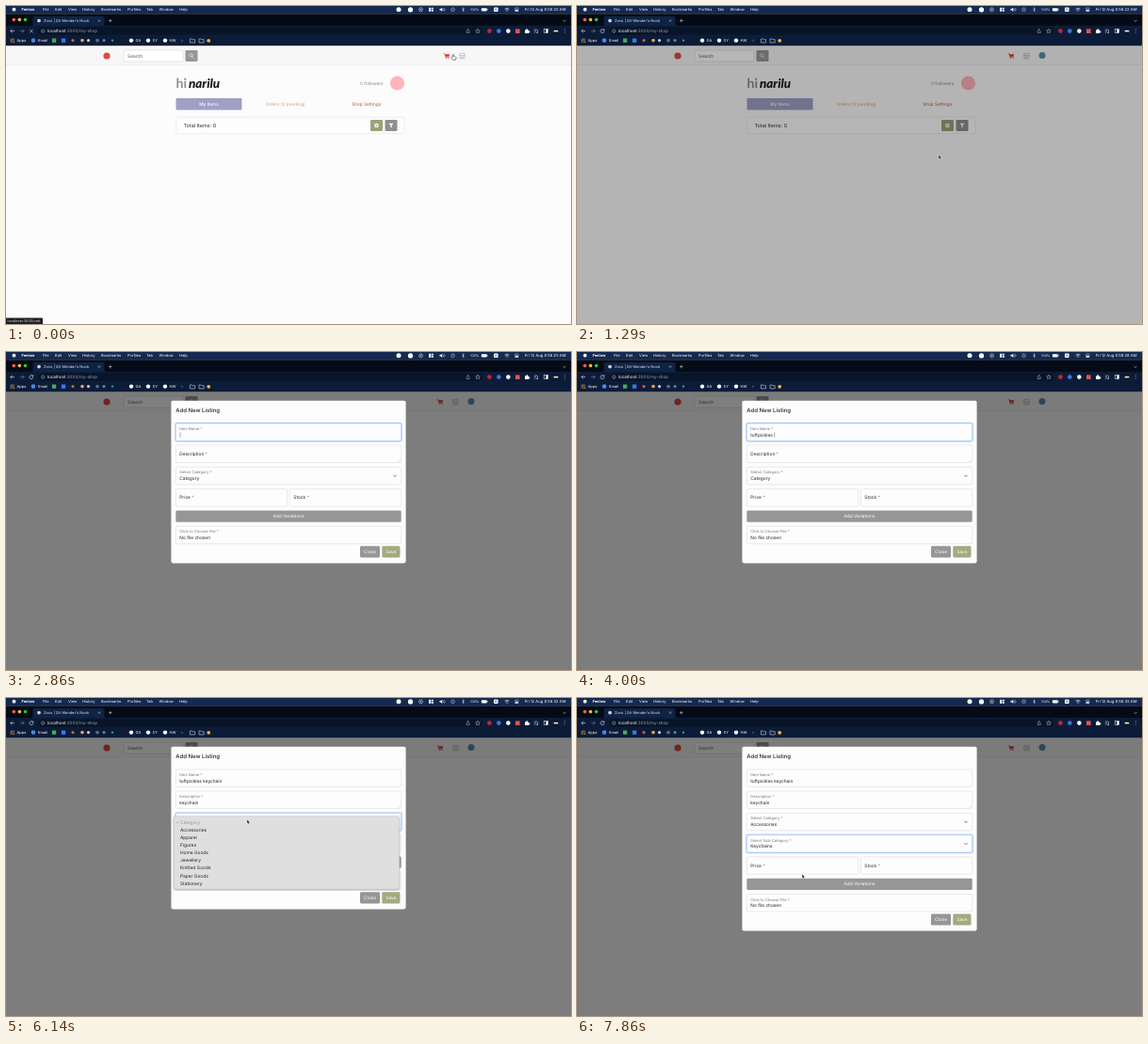
Write an HTML page that moves like this. It is 600 by 338 pixels and loops after 8000 ms.

```html
<!DOCTYPE html>
<html lang="en">
<head>
<meta charset="utf-8">
<title>Add New Listing</title>
<style>
  html, body { margin: 0; width: 100%; height: 100%; overflow: hidden; background: #fcfcfc; }
  svg { display: block; width: 100vw; height: 100vh; }
  text { font-family: Inter, "Liberation Sans", sans-serif; text-rendering: geometricPrecision; white-space: pre; }
</style>
</head>
<body>
<svg id="stage" viewBox="0 0 600 338"></svg>
<script>
const LOOP = 8000;
const stage = document.getElementById('stage');

function el(tag, attrs, parent, content) {
  const e = document.createElementNS('http://www.w3.org/2000/svg', tag);
  for (const k in attrs) e.setAttribute(k, attrs[k]);
  if (content !== undefined) e.textContent = content;
  parent.appendChild(e);
  return e;
}
const group = (p, attrs = {}) => el('g', attrs, p);
const box = (p, x, y, width, height, fill, more = {}) => el('rect', { x, y, width, height, fill, ...more }, p);
const dot = (p, cx, cy, r, fill, more = {}) => el('circle', { cx, cy, r, fill, ...more }, p);
const line = (p, d, stroke, w = 0.6, more = {}) => el('path', { d, stroke, 'stroke-width': w, fill: 'none', ...more }, p);
const shape = (p, d, fill, more = {}) => el('path', { d, fill, ...more }, p);
const label = (p, x, y, size, fill, str, more = {}) => el('text', { x, y, 'font-size': size, fill, ...more }, p, str);
const show = (e, on) => e.setAttribute('visibility', on ? 'inherit' : 'hidden');
const clamp = v => Math.max(0, Math.min(1, v));
const ramp = (t, a, b) => clamp((t - a) / (b - a));
const mid = { 'text-anchor': 'middle' };

// ---- page
const page = group(stage);
box(page, 0, 42, 600, 296, '#fcfcfc');
box(page, 0, 42, 600, 21, '#f7f7f7');
box(page, 0, 62.6, 600, 0.5, '#e2e2e2');
dot(page, 107, 53, 3.6, '#dd4b42');
box(page, 125, 47, 63, 12, '#fff', { rx: 1.2, stroke: '#cfcfcf', 'stroke-width': 0.5 });
label(page, 129, 54.8, 4.9, '#555', 'Search');
box(page, 190.5, 47, 13, 12, '#979797', { rx: 1.3 });
dot(page, 196.4, 52.4, 1.7, 'none', { stroke: '#fff', 'stroke-width': 0.6 });
line(page, 'M197.7 53.7l1.7 1.7', '#fff');

const nav = group(page);
line(nav, 'M464.6 50.6h1.2l1 3.6h4', '#d63a35', 0.6);
shape(nav, 'M466 51.2h5.2l-.8 2.6h-3.8z', '#d63a35');
dot(nav, 467.4, 55.2, 0.6, '#d63a35');
dot(nav, 470, 55.2, 0.6, '#d63a35');
line(nav, 'M481.8 52.6v3.2h5.2v-3.2M481.4 52.4l.6-2h4.8l.6 2zM483.4 55.6v-1.8h2v1.8', '#aaa', 0.6);
const userIcon = group(page);
dot(userIcon, 494, 52.4, 3.5, '#5a8fae');

label(page, 180.5, 87.4, 14, '#8d8d8d', 'hi', { 'font-family': 'Lato, sans-serif', style: 'font-family:Lato,sans-serif', 'font-weight': 700 });
label(page, 194, 87.4, 13.4, '#161616', 'narilu', { style: 'font-family:Lato,sans-serif', 'font-weight': 800, 'font-style': 'italic' });
label(page, 400.5, 83.6, 4.7, '#858585', '0 followers', { 'text-anchor': 'end' });
dot(page, 415.5, 82, 7.6, '#ffb3bb');

box(page, 180.5, 98, 70, 12.6, '#a09fc5', { rx: 1.3 });
label(page, 215.5, 106, 4.7, '#fff', 'My Items', { ...mid, 'font-weight': 500 });
label(page, 296.5, 106, 4.7, '#dda05a', 'Orders (0 pending)', mid);
label(page, 382.7, 106, 4.7, '#bd5538', 'Shop Settings', mid);

box(page, 180.7, 118.2, 242.3, 17.4, '#fdfdfd', { rx: 1.2, stroke: '#dfdfdf', 'stroke-width': 0.5 });
label(page, 188.5, 128.8, 5.45, '#2b2b2b', 'Total Items: 0');
box(page, 387, 121, 13, 12, '#99a377', { rx: 1.3 });
dot(page, 393.4, 127, 2.3, '#fff');
line(page, 'M392.1 127h2.6M393.4 125.7v2.6', '#99a377', 0.6);
box(page, 402.5, 121, 13, 12, '#8f8f8f', { rx: 1.3 });
shape(page, 'M406.5 124.8h5l-1.9 2.3v2.4l-1.2-.6v-1.8z', '#fff');

const shade = box(stage, 0, 42, 600, 296, '#000', { opacity: 0 });

// ---- modal
const modal = group(stage);
const sheet = box(modal, 175.4, 51.8, 249.2, 172.6, '#fdfdfd', { rx: 1.8 });
label(modal, 180.3, 63.8, 6, '#222', 'Add New Listing', { 'font-weight': 500 });

function field(p, x, y, w, name, value = '', select = false) {
  const ring = box(p, x - 0.4, y - 0.4, w + 0.8, 19.3, 'none', { rx: 1.6, stroke: '#b9d4fd', 'stroke-width': 1.5 });
  const edge = box(p, x, y, w, 18.5, '#fdfdfd', { rx: 1.2, 'stroke-width': 0.5 });
  const tag = el('text', { 'font-size': 4.8 }, p, name);
  el('tspan', { fill: '#b87070' }, tag, ' *');
  const text = label(p, x + 4, y + 13.5, 4.8, '#222', value);
  const caret = box(p, 0, y + 9.4, 0.4, 5.2, '#222');
  if (select) line(p, `M${x + w - 8.4} ${y + 8.5}l1.7 1.7l1.7-1.7`, '#444', 0.7);
  return (focus, float, str, typing) => {
    show(ring, focus);
    edge.setAttribute('stroke', focus ? '#86b7fe' : '#d4d4d4');
    tag.setAttribute('transform', `translate(${x + 4} ${y + 10.8 - 3.7 * float}) scale(${1 - 0.15 * float})`);
    tag.setAttribute('fill', float > 0.5 ? '#777' : '#222');
    if (text.textContent !== str) text.textContent = str;
    show(caret, focus && typing);
    if (focus && typing) caret.setAttribute('x', x + 4.5 + (str ? text.getComputedTextLength() : 0));
  };
}
const setName = field(modal, 180.3, 76, 239.4, 'Item Name');
const setDesc = field(modal, 180.3, 99, 239.4, 'Description');
line(modal, 'M416.9 116.6l1.8-1.8M418 116.6l.7-.7', '#999', 0.3);
const setCat = field(modal, 180.3, 122.3, 239.4, 'Select Category', 'Category', true);
const subRow = group(modal);
const setSub = field(subRow, 180.3, 145.6, 239.4, 'Select Sub-Category', 'Sub-Category', true);

const lower = group(modal);
field(lower, 180.3, 145.6, 118.4, 'Price')(false, 0, '');
field(lower, 301.3, 145.6, 118.4, 'Stock')(false, 0, '');
field(lower, 180.3, 185.3, 239.4, 'Click to Choose File')(false, 1, 'No file chosen');
function button(x, y, w, fill, str) {
  box(lower, x, y, w, 12.2, fill, { rx: 1.3 });
  label(lower, x + w / 2, y + 7.8, 4.8, '#fff', str, mid);
}
button(180.3, 168.5, 239.4, '#969696', 'Add Variations');
button(376, 206.2, 21, '#969696', 'Close');
button(399.3, 206.2, 19.2, '#a2ab80', 'Save');

// ---- native popup lists
function popup(y, items) {
  const g = group(stage);
  const h = items.length * 8.12 + 4.6;
  const frame = { rx: 2 };
  box(g, 177.4, y + 0.6, 241, h + 0.8, '#000', { rx: 2.4, opacity: 0.18 });
  box(g, 178, y, 239.8, h, '#dfdfe0', { ...frame, stroke: '#b8b8b8', 'stroke-width': 0.4 });
  const bar = box(g, 179.5, 0, 236.8, 8.1, '#3f82f5', { rx: 1.2 });
  const rows = items.map((s, i) => label(g, 185, y + 8.1 + i * 8.12, 4.85, i ? '#222' : '#999', s));
  line(g, `M181 ${y + 6.5}l.9 1.2l1.6-2.5`, '#999', 0.5);
  return (open, pos) => {
    show(g, open);
    const i = Math.floor((pos - y - 2.3) / 8.12);
    const hot = open && i > 0 && i < items.length;
    show(bar, hot);
    if (hot) bar.setAttribute('y', y + 2.3 + i * 8.12);
    rows.forEach((r, k) => k && r.setAttribute('fill', hot && k === i ? '#fff' : '#222'));
  };
}
const catList = popup(125.6, ['Category', 'Accessories', 'Apparel', 'Figures', 'Home Goods',
  'Jewellery', 'Knitted Goods', 'Paper Goods', 'Stationery']);
const subList = popup(148.9, ['Sub-Category', 'Bags', 'Earrings', 'Keychains', 'Necklaces',
  'Pins', 'Rings', 'Scarves', 'Straps', 'Others']);

// ---- browser and menu bar
const ui = group(stage);
const pale = '#e6eaf2';
box(ui, 0, 0, 600, 8.2, '#152a50');
box(ui, 0, 8.2, 600, 13, '#050b16');
box(ui, 0, 21, 600, 21.2, '#0c1c38');
shape(ui, 'M27 21.2q1.5 0 1.5-1.5v-7q0-1.7 1.7-1.7h72.6q1.7 0 1.7 1.7v7q0 1.5 1.5 1.5z', '#0f2345');
box(ui, 34, 22.4, 472, 8.4, '#081427', { rx: 4.2 });

dot(ui, 8.5, 3.7, 1.9, '#fff');
[[39, 'File'], [52, 'Edit'], [66, 'View'], [81, 'History'], [101, 'Bookmarks'], [129, 'Profiles'],
 [149, 'Tab'], [162.5, 'Window'], [184, 'Help']].forEach(([x, s]) => label(ui, x, 5.2, 4, '#fff', s));
label(ui, 16.5, 5.2, 4, '#fff', 'Fenlow', { 'font-weight': 700 });

dot(ui, 417, 3.7, 2.5, '#fff');
dot(ui, 429.5, 3.9, 2.6, '#fff');
dot(ui, 440.5, 3.8, 2, 'none', { stroke: '#cfd6e4', 'stroke-width': 0.6 });
dot(ui, 440.5, 3.8, 0.8, '#cfd6e4');
box(ui, 449, 1.8, 2, 4, '#fff');
box(ui, 451.6, 1.8, 2.2, 1.7, '#fff');
box(ui, 451.6, 4.1, 2.2, 1.7, '#fff');
shape(ui, 'M460.5 3h1.2l1.6-1.3v4.2l-1.6-1.3h-1.2z', '#fff');
line(ui, 'M464.3 2.6q1 1.2 0 2.4M465.4 2q1.6 1.8 0 3.6', '#fff', 0.4);
dot(ui, 474.5, 3.8, 1.9, 'none', { stroke: '#cfd6e4', 'stroke-width': 0.5 });
line(ui, 'M474.5 2.7v1.3h.9', '#cfd6e4', 0.4);
line(ui, 'M484.5 2.7l2 2.1l-1 1.1v-4.2l1 1.1l-2 2.1', '#fff', 0.4);
label(ui, 493, 5.1, 3.5, '#fff', '100%');
box(ui, 504.8, 2.2, 6, 3.2, '#fff', { rx: 0.8 });
box(ui, 511.2, 3.2, 0.5, 1.2, '#fff');
box(ui, 518, 1.6, 4.6, 4.4, '#fff', { rx: 0.8 });
label(ui, 520.3, 5.2, 3.8, '#152a50', 'A', mid);
line(ui, 'M529.6 3.2q2.4-2 4.8 0M530.5 4.2q1.5-1.2 3 0', '#fff', 0.6);
dot(ui, 532, 5.3, 0.5, '#fff');
box(ui, 540.3, 2, 4, 1.6, 'none', { rx: 0.8, stroke: '#fff', 'stroke-width': 0.4 });
box(ui, 540.3, 4.2, 4, 1.6, '#fff', { rx: 0.8 });
const clock = label(ui, 594.5, 5.2, 4.2, '#fff', '', { 'text-anchor': 'end' });

['#fe5f57', '#febc2e', '#28c840'].forEach((c, i) => dot(ui, 8.3 + i * 6.1, 14.6, 1.8, c));
dot(ui, 35, 15.6, 1.9, '#cfd3cb');
label(ui, 40, 17.1, 3.95, '#e4eaf4', "Zovu | QV Mender's Nook");
line(ui, 'M98 14.6l2 2m0-2l-2 2', pale, 0.5);
line(ui, 'M109 15.6h3.6M110.8 13.8v3.6', pale, 0.5);
line(ui, 'M591.4 15l1.6 1.6l1.6-1.6', pale, 0.5);

line(ui, 'M9 26.6h-4.2m1.9-1.9l-1.9 1.9l1.9 1.9', pale);
line(ui, 'M15 26.6h4.2m-1.9-1.9l1.9 1.9l-1.9 1.9', '#78849a');
const stop = line(ui, 'M25.3 25l3.2 3.2m0-3.2l-3.2 3.2', pale);
const reload = line(ui, 'M28.6 25.6a2 2 0 1 0 .3 1.5M28.9 24.4v1.6h-1.6', pale);
dot(ui, 39.2, 26.6, 1.7, 'none', { stroke: pale, 'stroke-width': 0.4 });
line(ui, 'M39.2 26.3v1.2', pale, 0.4);
const url = label(ui, 43.8, 28.2, 4.6, '#fff', 'localhost');
el('tspan', { fill: '#93a0b5' }, url, ':3000/my-shop');

line(ui, 'M489.2 26.2v2.4h3v-2.4M490.7 27.2v-2.8m-1 1l1-1l1 1', pale, 0.4);
shape(ui, 'M501 24.2l.7 1.6l1.7.1l-1.3 1.1l.4 1.7l-1.5-.9l-1.5.9l.4-1.7l-1.3-1.1l1.7-.1z', 'none', { stroke: pale, 'stroke-width': 0.4 });
dot(ui, 513.4, 26.6, 2.3, '#c4262c');
dot(ui, 523.3, 26.6, 2.3, '#3c78d8');
dot(ui, 533.3, 26.6, 2.3, '#f2f2f2');
box(ui, 541, 24.4, 4.6, 4.6, '#e2534d');
shape(ui, 'M551 25.4h1.4a.8.8 0 1 1 1.5 0h1.3v1.3a.8.8 0 1 1 0 1.4v1h-4.2z', '#fff');
line(ui, 'M560.8 25h3.2M560.8 26.6h2.2M560.8 28.2h1.6M564.6 25v3.2', pale, 0.5);
dot(ui, 564, 28.2, 0.7, pale);
box(ui, 571.2, 24.6, 4.2, 4, 'none', { stroke: '#fff', 'stroke-width': 0.5 });
box(ui, 573.4, 24.6, 2, 4, '#fff');
dot(ui, 584, 26.6, 2.8, '#111');
box(ui, 581.6, 25.8, 4.8, 1.8, '#dfe3e8', { rx: 0.6 });
[24.8, 26.6, 28.4].forEach(y => dot(ui, 593.2, y, 0.45, pale));

for (let i = 0; i < 9; i++)
  box(ui, 4.6 + i % 3 * 1.6, 34.6 + Math.floor(i / 3) * 1.6, 1.1, 1.1, ['#e8584b', '#f0b43c', '#58a55c'][(i + Math.floor(i / 3)) % 3]);
[[11.5, 'Apps'], [34, 'Email'], [137.5, 'GA'], [155.6, 'SY'], [173.5, 'HW']]
  .forEach(([x, s]) => label(ui, x, 38.2, 4, '#fff', s));
[[29, '#4a86e8', 2.3], [81, '#f0a050', 1.8], [87.5, '#c9ccd2', 1.6], [97, '#5d6b82', 1.9], [104, '#5f7fa8', 1.6],
 [133, '#fff', 2.2], [151, '#fff', 2.2], [169, '#fff', 2.2]].forEach(([x, c, r]) => dot(ui, x, 36.6, r, c));
box(ui, 48.9, 34.5, 4.3, 4.3, '#4da567');
box(ui, 58.9, 34.5, 4.3, 4.3, '#3b78e7');
dot(ui, 71, 36.6, 1.6, '#c8643c');
dot(ui, 113, 36.6, 1.2, '#38a868');
dot(ui, 187, 36.8, 1.4, '#25406c');
for (const x of [195.4, 205])
  shape(ui, `M${x} 35h2l.7.7h2.5v3.2h-5.2z`, 'none', { stroke: '#cdd4df', 'stroke-width': 0.6 });
dot(ui, 215.2, 36.8, 1.9, '#f0b840');

// ---- status bubble
const status = group(stage);
box(status, -1, 331.6, 40, 7.4, '#1c1f24', { rx: 1 });
label(status, 1.6, 336.2, 3.75, '#d5d8dc', 'localhost:3000/cart');

// ---- pointers
const outline = { stroke: '#fff', 'stroke-width': 0.4, 'stroke-linejoin': 'round' };
const pointer = group(stage);
const pointers = {
  arrow: shape(pointer, 'M0-1.8v4.4l1-.9l.7 1.6l.8-.4l-.7-1.5h1.3z', '#111', outline),
  hand: shape(pointer, 'M-.6-2.2q.6-.5 1 0v1.8l2.2.5q.6.3.4 1.2l-.6 2h-2.8l-1.7-2.2q0-.8.9-.4z', '#fff',
    { stroke: '#111', 'stroke-width': 0.5 }),
  beam: line(pointer, 'M-1-2.4q1 0 1 .7v3.4q0 .7-1 .7M1-2.4q-1 0-1 .7v3.4q0 .7 1 .7', '#111', 0.5)
};
const path = [[0, 475, 54], [280, 475, 54], [860, 393, 127], [1140, 393, 128], [1290, 384, 160], [1860, 268, 104],
  [2250, 262, 86], [5850, 250, 129], [6140, 256, 131], [6500, 257, 140], [7000, 259, 143], [7200, 251, 155],
  [7560, 240, 178], [7680, 239, 180], [7860, 239, 189]];
const kinds = [[0, 'hand'], [300, 'arrow'], [800, 'hand'], [1180, 'arrow'], [1500, 'beam'], [2780, ''], [5850, 'arrow']];

function along(t) {
  const i = path.findIndex(p => p[0] > t);
  if (i < 0) return path[path.length - 1].slice(1);
  const [a, b] = [path[i - 1], path[i]];
  const u = ramp(t, a[0], b[0]);
  const k = u * u * (3 - 2 * u);
  return [a[1] + (b[1] - a[1]) * k, a[2] + (b[2] - a[2]) * k];
}

const typed = (str, t, start, pace) => str.slice(0, Math.max(0, Math.floor((t - start) / pace)));

function draw(t) {
  const loaded = t >= 140;
  show(stop, !loaded);
  show(reload, loaded);
  show(userIcon, loaded);
  nav.setAttribute('transform', `translate(${loaded ? -7 : 0} 0)`);
  show(status, t < 400);
  clock.textContent = `Fri 12 Aug 8:58:${Math.floor(20.1 + t / 500)} AM`;

  shade.setAttribute('opacity', 0.5 * ramp(t, 1245, 1325));
  const rise = 1 - (1 - ramp(t, 1340, 1490)) ** 2;
  modal.setAttribute('opacity', rise);
  modal.setAttribute('transform', `translate(0 ${-15.6 * (1 - rise)})`);

  const name = typed('tuftpickles ', t, 2800, 95) + typed('keychain', t, 4060, 105);
  const desc = typed('keychain', t, 5350, 45);
  const picked = t >= 6760, subPicked = t >= 7720;
  setName(t >= 2400 && t < 5100, ramp(t, 2400, 2450), name, true);
  setDesc(t >= 5100 && t < 5960, ramp(t, 5100, 5150), desc, true);
  setCat(t >= 5960 && t < 7240, 1, picked ? 'Accessories' : 'Category');
  setSub(t >= 7240, 1, subPicked ? 'Keychains' : 'Sub-Category');
  show(subRow, picked);
  lower.setAttribute('transform', `translate(0 ${picked ? 23.2 : 0})`);
  sheet.setAttribute('height', picked ? 195.8 : 172.6);

  const [x, y] = along(t);
  catList(t >= 5960 && !picked, y);
  subList(t >= 7240 && !subPicked, y);
  pointer.setAttribute('transform', `translate(${x} ${y})`);
  const kind = kinds.filter(k => k[0] <= t).pop()[1];
  for (const k in pointers) show(pointers[k], k === kind);
}

const start = performance.now();
function tick() {
  draw((performance.now() - start) % LOOP);
  requestAnimationFrame(tick);
}
tick();
</script>
</body>
</html>
```
